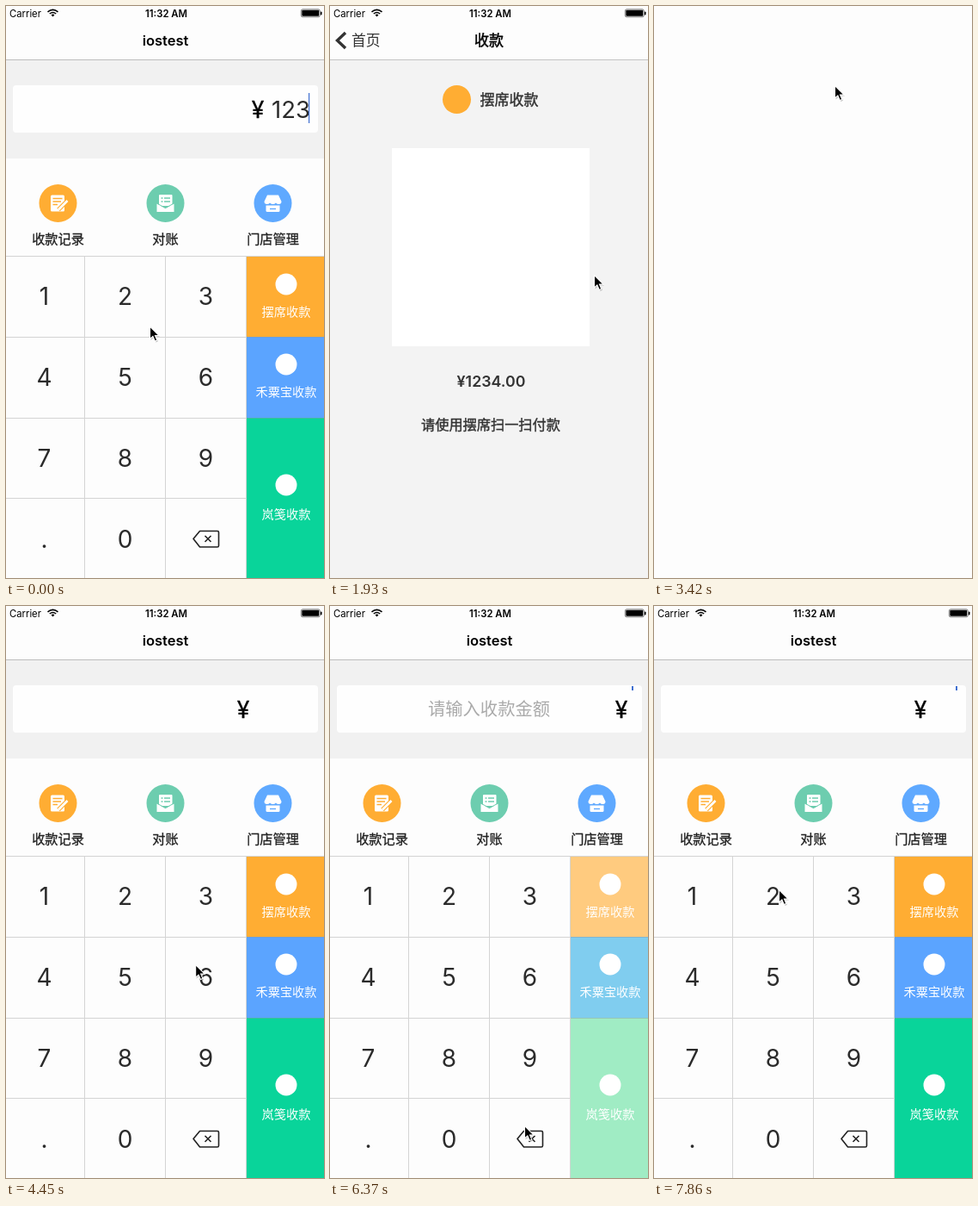
Animation of 370x664 px, one loop 8000 ms. Source, as an HTML page:

```html
<!DOCTYPE html>
<html lang="zh-CN">
<head>
<meta charset="utf-8">
<title>收款</title>
<style>
html, body { margin: 0; width: 100%; height: 100%; overflow: hidden; background: #fdfdfd; }
svg { display: block; width: 370px; height: 664px; font-family: Inter, "Noto Sans CJK SC", "Noto Sans CJK", sans-serif; }
.mid { text-anchor: middle; }
.key { font-size: 28px; fill: #2b2b2b; text-anchor: middle; }
.label { font-size: 15.2px; fill: #222; stroke: #222; stroke-width: .3px; text-anchor: middle; }
.way { font-size: 14.2px; fill: #fff; text-anchor: middle; }
.bold { font-weight: 600; }
.med { fill: #333; stroke: #333; stroke-width: .4px; }
.w { fill: #fff; }
</style>
</head>
<body>
<svg viewBox="0 0 370 664">
  <g id="home">
    <rect width="370" height="664" fill="#fdfdfd"/>
    <rect y="62" width="370" height="115" fill="#f1f1f1"/>
    <path d="M0 62.500H370" stroke="#bdbdbd"/>
    <text class="mid bold" x="185.5" y="46" font-size="16.5">iostest</text>
    <rect x="8" y="92" width="355" height="55" rx="4" fill="#fefefe"/>
    <text id="hint" class="mid" x="185" y="127" font-size="20.3" fill="#aaa">请输入收款金额</text>
    <text id="yen" class="mid" y="129.5" font-size="26.500" stroke="#000" stroke-width=".3">¥</text>
    <text id="amount" x="354" y="129.5" font-size="27.500" text-anchor="end" fill="#2b2b2b"></text>
    <rect id="caret" fill="#3f6fd0"/>

    <circle cx="60.5" cy="229" r="22" fill="#ffad33"/>
    <rect class="w" x="52" y="219.5" width="16" height="19" rx="1.5"/>
    <path d="M54.500 223.500H65.500M54.500 227H64M54.500 230.500H60" stroke="#ffad33" stroke-width="1.3"/>
    <path d="M61 236.500L71.500 226" stroke="#ffad33" stroke-width="5"/>
    <path d="M61 236.500L71.500 226" stroke="#fff" stroke-width="2.600"/>
    <text class="label" x="60.5" y="275.5">收款记录</text>

    <circle cx="185.500" cy="229" r="22" fill="#6dcdaf"/>
    <rect class="w" x="178" y="219" width="15.500" height="13" rx="1"/>
    <path d="M180.500 223H182.500M184 223H191M180.500 227H182.500M184 227H191" stroke="#6dcdaf" stroke-width="1.5"/>
    <path class="w" d="M175.500 229.500L185.500 235L195.500 229.500V239H175.500Z"/>
    <path d="M175.500 229L185.500 234.500L195.500 229" fill="none" stroke="#6dcdaf"/>
    <text class="label" x="185.5" y="275.5">对账</text>

    <circle cx="310.500" cy="229" r="22" fill="#5fa9ff"/>
    <path class="w" d="M304 219.500H317L320.500 227Q320.500 230 317.500 230Q315 230 314 228.500Q312.500 230 310.500 230Q308.500 230 307 228.500Q306 230 303.500 230Q300.500 230 300.500 227Z"/>
    <path class="w" d="M302.500 231.500H318.500V237.500Q318.500 239 317 239H304Q302.500 239 302.500 237.500Z"/>
    <path d="M307 235.500H314" stroke="#5fa9ff" stroke-width="1.4"/>
    <text class="label" x="310.5" y="275.5">门店管理</text>

    <g id="keys"></g>
    <path d="M218 618.500L225.500 609.500H246Q247.500 609.500 247.500 611V626.500Q247.500 628 246 628H225.500ZM231.500 615L238.500 622M238.500 615L231.500 622" fill="none" stroke="#222" stroke-width="1.6" stroke-linejoin="round"/>
    <g id="ways"></g>
    <path d="M0 290.500H370M0 384.500H279M0 478.500H279M0 571.500H279M91.500 290V664M185.500 290V664M279.500 290V664" stroke="#d4d4d4"/>
  </g>

  <g id="pay">
    <rect width="370" height="664" fill="#f3f3f3"/>
    <rect width="370" height="62" fill="#fdfdfd"/>
    <path d="M0 62.500H370" stroke="#c4c4c4"/>
    <path d="M18 31L8.500 40L18 49" fill="none" stroke="#333" stroke-width="3.4"/>
    <text x="25" y="46" font-size="16.800" fill="#333">首页</text>
    <text class="mid" x="185" y="46" font-size="17" stroke="#000" stroke-width=".5">收款</text>
    <circle cx="147.500" cy="108.500" r="16.500" fill="#ffad33"/>
    <text class="med" x="174.500" y="114.500" font-size="17">摆席收款</text>
    <rect class="w" x="72" y="165" width="230" height="230"/>
    <text class="mid bold" x="187.500" y="442" font-size="17.800" fill="#333">¥1234.00</text>
    <text class="mid med" x="187" y="491.500" font-size="16.200">请使用摆席扫一扫付款</text>
  </g>

  <g id="status">
    <text x="4" y="12.500" font-size="11.300">Carrier</text>
    <path d="M48.500 6.800Q54.500 1.800 60.500 6.800M50.800 9Q54.500 6 58.200 9" fill="none" stroke="#000" stroke-width="1.6"/>
    <path d="M52.500 10.300Q54.500 8.800 56.500 10.300L54.500 12.600Z"/>
    <text class="mid bold" x="186.500" y="12.500" font-size="11.300">11:32 AM</text>
    <rect x="343.300" y="3.800" width="22" height="9" rx="2" fill="none" stroke="#000" stroke-width=".5"/>
    <rect x="344.300" y="4.800" width="20" height="7" rx="1"/>
    <rect x="366" y="6.500" width="1.500" height="4" rx=".7"/>
  </g>

  <rect id="blank" width="370" height="664" fill="#fdfdfd"/>

  <g id="cursor">
    <path d="M1 2V16L4.400 13L7 18.500L9.500 17.300L7 12H11.500Z" opacity=".22"/>
    <path d="M0 0V14.500L3.400 11.500L5.800 17L8.300 16L6 10.600H10.600Z" stroke="#fff" stroke-width="1.1"/>
  </g>
</svg>
<script>
const $ = id => document.getElementById(id);
const LOOP = 8000;
const show = (id, on) => $(id).style.display = on ? '' : 'none';
const shift = (id, x, y = 0) => $(id).setAttribute('transform', `translate(${x} ${y})`);

// Keypad
const colX = [0, 92, 186, 279], rowY = [291, 385, 479, 572, 664];
const names = ['1', '2', '3', '4', '5', '6', '7', '8', '9', '.', '0', 'del'];
$('keys').innerHTML = names.map((name, i) => {
  const c = i % 3, r = i / 3 | 0, x = colX[c], y = rowY[r];
  const text = name === 'del' ? '' : `<text class="key" x="${44.5 + 94 * c}" y="${347 + 94 * r}">${name}</text>`;
  return `<rect id="key${name}" x="${x}" y="${y}" width="${colX[c + 1] - x}" height="${rowY[r + 1] - y}" fill="#888"/>${text}`;
}).join('');

// Payment buttons: name, top, height, icon y, label y, enabled and disabled colour
const ways = [
  ['摆席收款', 290, 94, 323, 360, '#ffad33', '#ffcb7f'],
  ['禾粟宝收款', 384, 94, 416, 453, '#5ba4ff', '#80cdef'],
  ['岚笺收款', 478, 186, 556, 595, '#09d49a', '#a0ecc4']
];
$('ways').innerHTML = ways.map(([name, y, h, iconY, textY], i) =>
  `<rect id="way${i}" x="279" y="${y}" width="91" height="${h}"/>
   <circle class="w" cx="326" cy="${iconY}" r="12.5"/>
   <text class="way" x="326" y="${textY}">${name}</text>`).join('')
  + '<path d="M279 384.500H370M279 478.500H370" stroke="#8b9aa5" opacity=".45"/>';

// Key presses: name, down, up, digits afterwards
const presses = [
  ['4', 720, 880, 4],
  ['del', 4850, 5030, 3], ['del', 5400, 5610, 2], ['del', 5890, 6050, 1], ['del', 6200, 6350, 0],
  ['1', 6950, 7110, 1], ['2', 7620, 7770, 2]
];

// Pointer stops: time, x, y
const stops = [
  [0, 167.5, 372], [650, 46, 430], [1040, 46, 430], [1600, 315.5, 346.5], [1700, 315.5, 346.5], [1930, 307.5, 312.5],
  [2650, 14, 36], [2850, 14, 36], [3420, 210.5, 92.5], [4020, 210.5, 92.5], [4750, 226.5, 603.5],
  [6400, 226.5, 603.5], [6860, 40, 336], [7150, 40, 336], [7580, 145.5, 329.5], [LOOP, 145.5, 329.5]
];
const clamp = v => Math.max(0, Math.min(1, v));
const smooth = v => v * v * (3 - 2 * v);

function pointer(t) {
  const i = stops.findIndex(s => s[0] > t);
  const [t0, x0, y0] = stops[i - 1], [t1, x1, y1] = stops[i];
  const k = smooth((t - t0) / (t1 - t0));
  return [x0 + (x1 - x0) * k, y0 + (y1 - y0) * k];
}

function draw(t) {
  const before = t < 3060;
  let digits = 3;
  for (const name of names) show('key' + name, false);
  for (const [name, down, up, n] of presses) {
    if (t >= up) digits = n;
    if (t >= down && t < up) show('key' + name, true);
  }

  $('yen').setAttribute('x', digits ? 344 - 17 * digits : 339);
  $('amount').textContent = before ? '1234'.slice(0, digits) : '';
  show('hint', !digits);
  ways.forEach((w, i) => $('way' + i).setAttribute('fill', w[digits ? 5 : 6]));

  // Blinking full-height caret at first, a short stub after the return
  show('caret', before ? t < 500 || t > 880 && t < 1400 : t > 5030);
  const [x, y, w, h] = before ? [352, 101, 1.2, 35] : [351, 93, 2, 5];
  Object.entries({ x, y, width: w, height: h }).forEach(([k, v]) => $('caret').setAttribute(k, v));

  const k = 1 - (1 - clamp((t - 1660) / 250)) ** 3;
  show('pay', t >= 1660 && before);
  shift('pay', 370 * (1 - k));
  shift('home', before ? -110 * k : 0);
  show('blank', !before && t < 3540);
  shift('cursor', ...pointer(t));
}

function tick(now) {
  draw(now % LOOP);
  requestAnimationFrame(tick);
}
draw(0);
requestAnimationFrame(tick);
</script>
</body>
</html>
```
